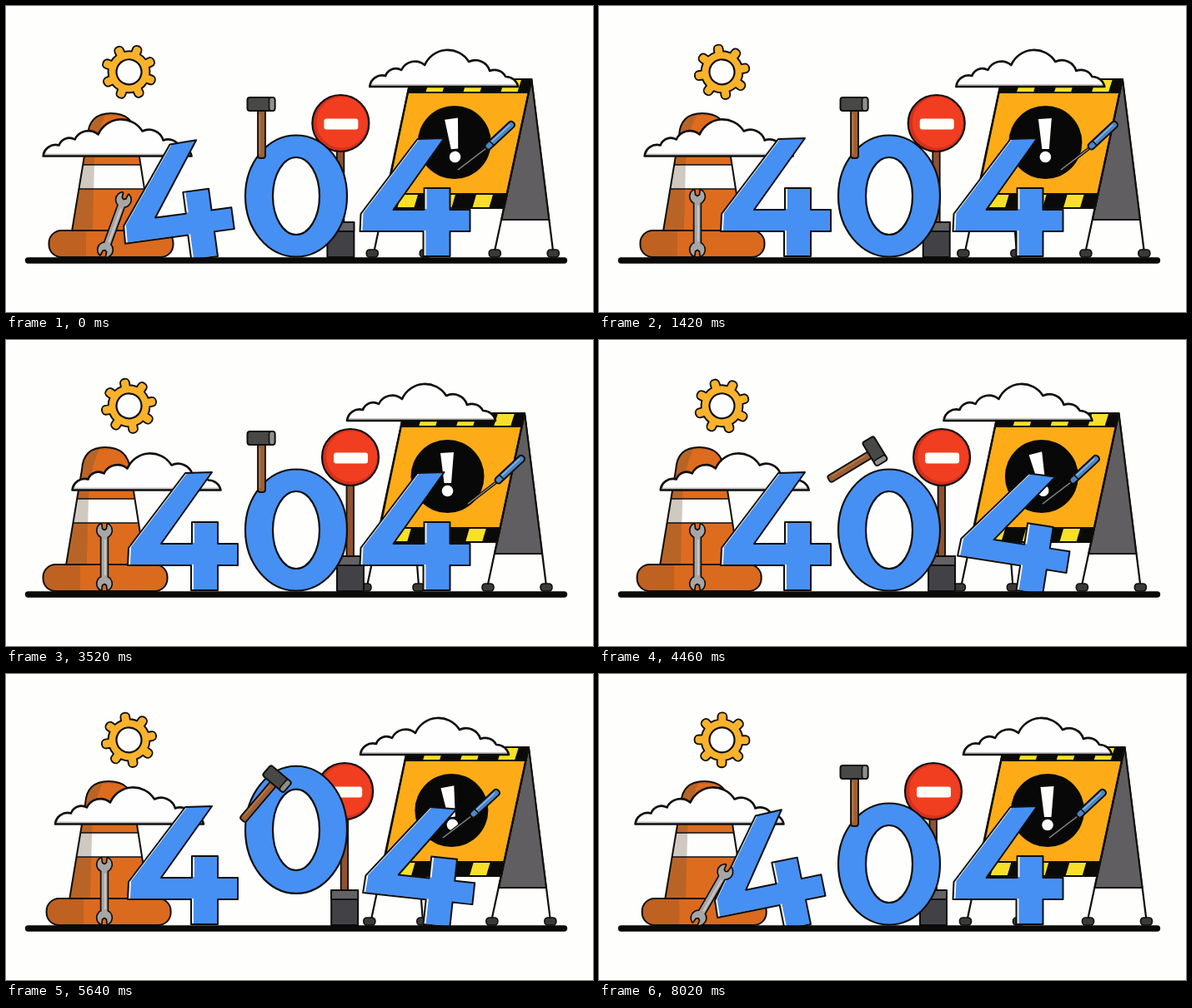
Animation, 704 px wide and 368 px high, one loop 8.04 s. Source, as an HTML page with a canvas:

```html
<!DOCTYPE html>
<html lang="en">
<head>
<meta charset="utf-8">
<title>404</title>
<style>
  html, body { margin: 0; width: 100%; height: 100%; overflow: hidden; background: #fefefd; }
  canvas { display: block; }
</style>
</head>
<body>
<canvas id="stage" width="704" height="368"></canvas>
<script>
const ctx = document.getElementById('stage').getContext('2d');
const LOOP = 8040, INK = '#0f0e0c', PAPER = '#fefefd', BLUE = '#4690f4', RAD = Math.PI / 180;

// ---------- timing ----------
// Steps are held for 20, 100 and 20 ms in turn, with one extra short step.
function stepAt(ms) {
  let extra = 0;
  if (ms >= 4920) { ms -= 20; extra = 1; }
  const r = ms % 140;
  return 3 * Math.floor(ms / 140) + (r >= 120 ? 2 : r >= 20 ? 1 : 0) + extra;
}

function ease(n, from, to) {
  const p = Math.min(1, Math.max(0, (n - from) / (to - from)));
  return p * p * (3 - 2 * p);
}

// Smooth curve through [step, value] points without overshoot.
function curve(pts, n) {
  let i = 0;
  while (i < pts.length - 2 && n >= pts[i + 1][0]) i++;
  const slope = k => (pts[k + 1][1] - pts[k][1]) / (pts[k + 1][0] - pts[k][0]);
  const tangent = k => {
    if (k === 0) return slope(0);
    if (k === pts.length - 1) return slope(k - 1);
    const a = slope(k - 1), b = slope(k);
    return a * b <= 0 ? 0 : (a + b) / 2;
  };
  const [x0, y0] = pts[i], [x1, y1] = pts[i + 1];
  const w = x1 - x0, u = (n - x0) / w, u2 = u * u, u3 = u2 * u;
  return y0 * (2 * u3 - 3 * u2 + 1) + y1 * (3 * u2 - 2 * u3)
    + w * (tangent(i) * (u3 - 2 * u2 + u) + tangent(i + 1) * (u3 - u2));
}

const SWAY = [[0, .03], [31, .31], [76, 1], [81, 1.02], [95, .84], [122, .43], [146, .16], [173, 0]];
const DRIVER = [[0, -12], [22, 0], [76, 0], [95, -22], [118, -30], [146, -28], [173, -14]];
const WOBBLE = [[0, -5], [22, 0], [76, 0], [95, -11], [122, -7], [146, 6], [173, 0]];

// ---------- drawing helpers ----------
function at(x, y, deg, draw) {
  ctx.save();
  ctx.translate(x, y);
  ctx.rotate(deg * RAD);
  draw();
  ctx.restore();
}

function poly(...p) {
  const path = new Path2D();
  for (let i = 0; i < p.length; i += 2) path.lineTo(p[i], p[i + 1]);
  path.closePath();
  return path;
}

function rect(x, y, w, h, r = 0) {
  const path = new Path2D();
  path.roundRect(x, y, w, h, r);
  return path;
}

function disc(x, y, rx, ry = rx) {
  const path = new Path2D();
  path.ellipse(x, y, rx, ry, 0, 0, 7);
  return path;
}

function fill(path, color) {
  ctx.fillStyle = color;
  ctx.fill(path);
}

function ink(path, width = 2, color = INK) {
  ctx.lineWidth = width;
  ctx.strokeStyle = color;
  ctx.stroke(path);
}

function shape(path, color, width) {
  fill(path, color);
  ink(path, width);
}

// Joined sub-paths with one outline around the union.
function union(path, color, width = 1.6) {
  ink(path, width * 2);
  fill(path, color);
}

function line(x0, y0, x1, y1, width, color) {
  ink(new Path2D(`M${x0} ${y0}L${x1} ${y1}`), width, color);
}

function within(path, draw) {
  ctx.save();
  ctx.clip(path);
  draw();
  ctx.restore();
}

// ---------- objects ----------
const CLOUD = new Path2D('M0 0A15 15 0 0 1 19-13A13 13 0 0 1 38-20A18 18 0 0 1 66-26' +
  'A30 30 0 0 1 119-30A18 18 0 0 1 144-19A15 15 0 0 1 163-12A15 15 0 0 1 178 0Z');

function cloud(x, y) {
  at(x, y, 0, () => {
    fill(CLOUD, '#c4c4c4');
    within(CLOUD, () => at(3, -3, 0, () => fill(CLOUD, '#fefefe')));
    ink(CLOUD, 2.6);
  });
}

function gear(deg) {
  at(147.5, 79.3, deg, () => {
    const g = new Path2D();
    g.arc(0, 0, 24, 0, 7);
    g.closePath();
    for (let i = 0; i < 8; i++) {
      const m = new DOMMatrix().rotate(i * 45);
      g.addPath(rect(-4.5, -32, 9, 14, 4), m);
    }
    union(g, '#f9b22c', 1.9);
    shape(disc(0, 0, 15), PAPER, 2.2);
  });
}

function cone(dx) {
  at(dx, 0, 0, () => {
    const body = new Path2D('M72 271L91 156C92 138 102 129 119 129C137 129 147 138 149 156L167 271Z');
    fill(body, '#de6c1e');
    within(body, () => {
      fill(rect(60, 191, 120, 29), '#fdfdfb');
      fill(new Path2D('M60 300L60 120L118 120Q100 150 99 191L96 300Z'), 'rgba(100,80,60,.3)');
      line(60, 191, 180, 191, 1.6, INK);
      line(60, 220, 180, 220, 1.6, INK);
      fill(rect(60, 120, 120, 12), 'rgba(90,40,0,.15)');
    });
    ink(body);
    const base = rect(44.5, 270, 149, 32, 15);
    fill(base, '#da6a1e');
    within(base, () => fill(rect(40, 268, 49, 40), 'rgba(110,70,40,.25)'));
    ink(base);
  });
}

function stopSign(dx) {
  at(dx, 0, 0, () => {
    shape(rect(408.5, 170, 8.5, 92), '#8f5230', 1.8);
    shape(rect(397, 260, 32, 42), '#424246');
    shape(rect(397, 260, 32, 11), '#626264', 1.8);
    shape(disc(413, 141, 34), '#d4301c', 2.2);
    fill(disc(414.5, 140, 30.5), '#f23e20');
    fill(rect(393, 135.5, 41, 13, 3), '#fefcf6');
  });
}

function foot(x) {
  shape(rect(x - 7, 293, 14, 9, 4), '#3c3a38', 1.6);
}

function panel(dx, wobble) {
  at(dx, 0, 0, () => {
    line(622, 88, 648, 296, 2.2);
    line(491, 243, 495, 296, 2.2);
    shape(poly(622, 88, 643, 257, 586, 257), '#605e60');
    const board = poly(477, 88, 622, 88, 589, 243, 445, 243);
    fill(board, '#fdac18');
    within(board, () => {
      for (const [y, h, x] of [[88, 16, 455], [226, 17, 421]]) {
        fill(rect(430, y, 210, h), '#0a0a08');
        for (let i = 0; i < 4; i++) {
          const s = x + i * 45;
          fill(poly(s, y, s + 20, y, s + 15, y + h, s - 5, y + h), '#f8e02a');
        }
        ink(rect(425, y, 220, h), 1.8);
      }
    });
    ink(board, 2.2);
    line(477, 88, 433, 296, 2.2);
    line(622, 88, 577.5, 296, 2.2);
    fill(disc(529.5, 164, 44), '#080808');
    at(529, 172, wobble, () => {
      fill(poly(-8, -36, 8, -37, 5, 0, -3.5, 0), '#fefefc');
      fill(disc(.5, 9.5, 6.8), '#fefefc');
    });
    foot(431);
    foot(495);
    foot(578);
    foot(648);
  });
}

// Drawn relative to the lower left corner of the stem.
const FOUR = poly(-7, -141, 25, -142, -36, -56, 1, -56, 1, -82, 32, -82, 32, -56,
  56, -56, 56, -30, 32, -30, 32, 0, 0, 0, 0, -30, -76, -30, -75, -51);

function four() {
  fill(FOUR, '#f3f3ea');
  within(FOUR, () => at(3, -1, 0, () => fill(FOUR, BLUE)));
  ink(FOUR);
}

function zero(rise) {
  at(348, 228.5 - rise, 0, () => {
    const k = 1 + .05 * rise / 42;
    const ring = disc(0, 0, 61, 73 * k);
    const hole = disc(0, 0, 28, 46.5 * k);
    const both = new Path2D(ring);
    both.addPath(hole);
    ctx.fillStyle = BLUE;
    ctx.fill(both, 'evenodd');
    ink(ring, 2.2);
    ink(hole, 2.2);
  });
}

function hammer(deg) {
  at(304.5, 148, deg, () => {
    shape(rect(-2.5, -25, 9, 60, 3), '#9c5f36', 1.8);
    line(0, -18, 0, 30, 1.5, '#b97a4c');
    shape(rect(-15, -38, 33, 16, 3), '#484846');
    shape(rect(11, -38, 7, 16, 3), '#8e8e8c', 1.6);
  });
}

function jaw(y, turn) {
  const p = new Path2D(), a = 28 * RAD, up = -Math.PI / 2;
  p.arc(0, 0, 8.5, up + a, up - a + 2 * Math.PI);
  p.lineTo(-3.2, -1.5);
  p.lineTo(0, .5);
  p.lineTo(3.2, -1.5);
  p.closePath();
  const placed = new Path2D();
  placed.addPath(p, new DOMMatrix().translate(0, y).rotate(turn));
  return placed;
}

function wrench(deg) {
  at(118, 296, deg, () => {
    const w = new Path2D();
    w.addPath(rect(-3.5, -62, 7, 56));
    w.addPath(jaw(-67, 0));
    w.addPath(jaw(-3, 180));
    union(w, '#a6a6a6', 1.7);
    line(1, -56, 1, -13, 2, '#c8c8c8');
  });
}

function screwdriver(dx) {
  at(620 + dx, 141, 0, () => {
    line(-32, 30, -67, 57, 3.6, INK);
    line(-32, 30, -66, 56, 1.4, '#8c8a88');
    at(0, 0, 137, () => {
      shape(rect(-1, -4, 45, 8, 3.5), '#4a86c8');
      line(4, 1.2, 34, 1.2, 1.4, '#8fbbe2');
      line(35, -4, 35, 4, 1.5, INK);
    });
  });
}

function ground() {
  ctx.lineCap = 'round';
  line(26.5, 306, 669.5, 306, 7.4, '#0a0a0a');
  ctx.lineCap = 'butt';
}

// ---------- scene ----------
function draw(n) {
  const s = curve(SWAY, n);
  const lean = n < 65 ? 11.5 * (1 - ease(n, -17, 27)) : 11.5 * ease(n, 130, 174);
  const tip = 11 * (ease(n, 77, 102) - ease(n, 103, 144));
  const rise = 42 * (ease(n, 100, 124) - ease(n, 124, 160));

  fill(rect(0, 0, 704, 368), PAPER);
  gear(20 + 1.97 * n);
  panel(8.5 * (1 - s), curve(WOBBLE, n));
  cloud(437 - 28 * s, 97);
  stopSign(-12 * (1 - s));
  cone(7.2 * (1 - s));
  cloud(43.5 + 36 * s, 180.5);

  at(254, 301, -lean, () => {
    ctx.translate(-32, 0);
    four();
  });
  at(500.5, 301, tip, four);
  zero(rise);
  hammer(tip * 6.6);
  wrench(lean * 2.6);
  screwdriver(curve(DRIVER, n));
  ground();
}

ctx.lineJoin = 'round';
let start;
function tick(now) {
  if (start === undefined) start = now;
  draw(stepAt((now - start) % LOOP));
  requestAnimationFrame(tick);
}
draw(0);
requestAnimationFrame(tick);
</script>
</body>
</html>
```
